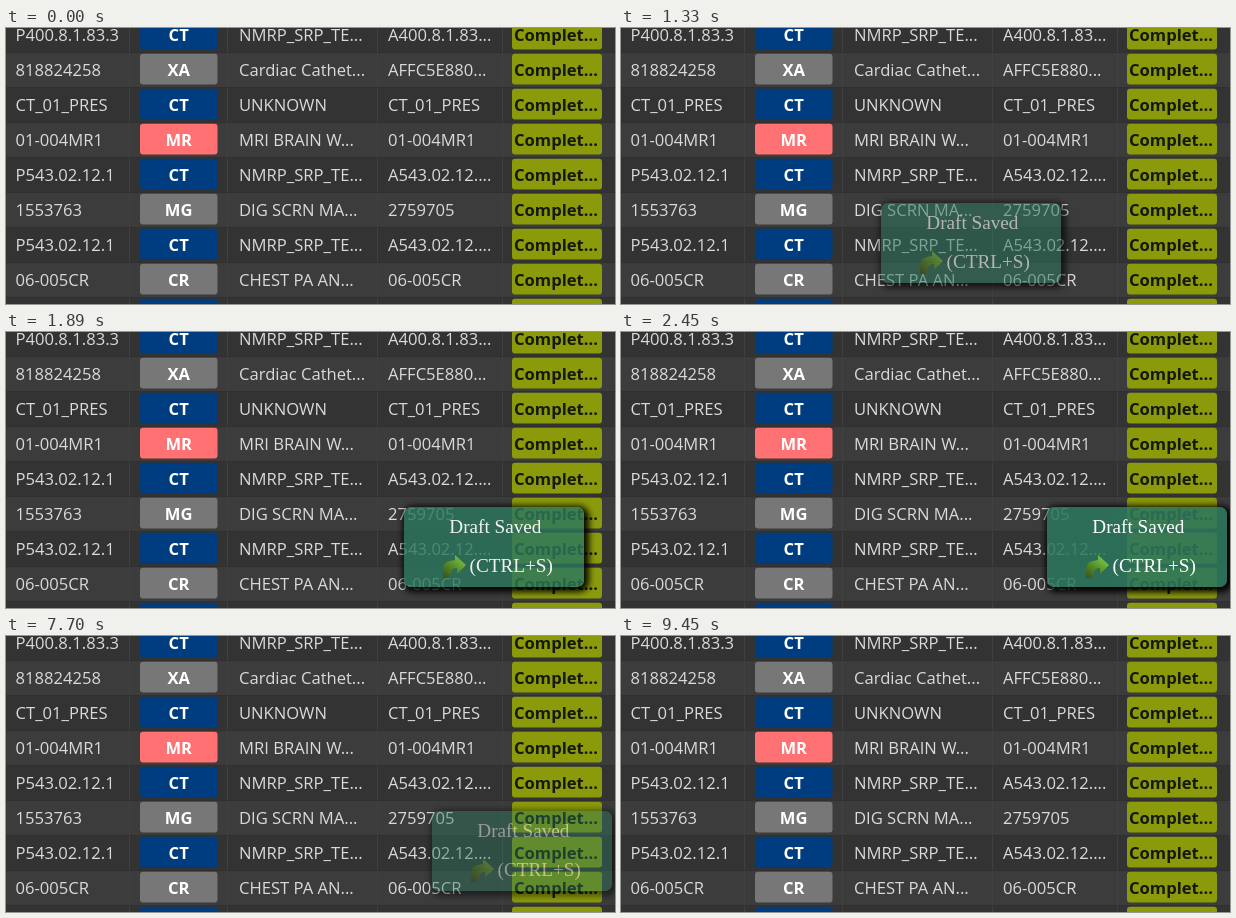
An HTML page with a canvas that plays this animation: 609 by 276 pixels, repeating every 9.59 s.

```html
<!DOCTYPE html>
<html lang="en">
<head>
<meta charset="utf-8">
<title>Draft saved notice</title>
<style>
  html, body { margin: 0; width: 100%; height: 100%; overflow: hidden; background: #353535; }
  canvas { position: absolute; left: 0; top: 0; }
  #toast {
    position: absolute; left: 0; top: 175px; width: 180px; height: 80px;
    border-radius: 7px; background: rgba(44, 119, 93, .87);
    box-shadow: 2px 2px 6px 3px #000; opacity: 0;
  }
  #toast svg { display: block; }
  #toast text { font: 19.2px "Liberation Serif", serif; fill: #fff; }
</style>
</head>
<body>
<canvas id="table" width="609" height="276"></canvas>
<div id="toast">
  <svg width="180" height="80">
    <defs>
      <linearGradient id="leaf" x1="0" y1="1" x2=".8" y2="0">
        <stop offset="0" stop-color="#3a4f1c"/>
        <stop offset=".45" stop-color="#568a24"/>
        <stop offset="1" stop-color="#7fd24a"/>
      </linearGradient>
    </defs>
    <text x="45.3" y="26">Draft Saved</text>
    <path d="M39 71 V63 Q39 55 46 54 L51 53 V48 L62 58 L53 67 V61 Q47 61 47 66 L45 71Z" fill="url(#leaf)"/>
    <text x="65.5" y="65">(CTRL+S)</text>
  </svg>
</div>
<script>
const LOOP = 9590, STEP = 70, PITCH = 35;
const FONT = '16.6px "Open Sans", sans-serif';
const TEXT = '#dadada';
const BADGE = { CT: '#003d80', MR: '#ff7173' };
const ROWS = [
  ['P400.8.1.83.3', 'CT', 'NMRP_SRP_TE...', 'A400.8.1.83...'],
  ['818824258', 'XA', 'Cardiac Cathet...', 'AFFC5E880...'],
  ['CT_01_PRES', 'CT', 'UNKNOWN', 'CT_01_PRES'],
  ['01-004MR1', 'MR', 'MRI BRAIN W...', '01-004MR1'],
  ['P543.02.12.1', 'CT', 'NMRP_SRP_TE...', 'A543.02.12....'],
  ['1553763', 'MG', 'DIG SCRN MA...', '2759705'],
  ['P543.02.12.1', 'CT', 'NMRP_SRP_TE...', 'A543.02.12....'],
  ['06-005CR', 'CR', 'CHEST PA AN...', '06-005CR'],
  ['', 'CT', '', '']
];
const ctx = document.getElementById('table').getContext('2d');
const toast = document.getElementById('toast');

function label(text, x, y, color, bold, align = 'left') {
  ctx.font = (bold ? 'bold ' : '') + FONT;
  ctx.textAlign = align;
  ctx.fillStyle = color;
  ctx.fillText(text, x, y);
}

function badge(x, y, w, color) {
  ctx.fillStyle = color;
  ctx.beginPath();
  ctx.roundRect(x, y, w, 30.7, 3);
  ctx.fill();
}

function drawTable() {
  ROWS.forEach(([id, kind, study, access], i) => {
    const top = (i - 1) * PITCH + 24, base = top + 23.6;
    ctx.fillStyle = i % 2 ? '#3c3c3c' : '#333333';
    ctx.fillRect(0, top, 609, PITCH);
    ctx.fillStyle = '#303030';
    ctx.fillRect(0, top, 609, 1);
    ctx.fillStyle = '#414141';
    for (const x of [123, 221, 371, 496]) ctx.fillRect(x, top + 1, 1, PITCH - 1);
    badge(134, top + 1.8, 77.5, BADGE[kind] || '#777777');
    badge(506, top + 1.8, 90, '#8a9a0b');
    label(id, 9.5, base, TEXT);
    label(kind, 172.7, base, '#ffffff', true, 'center');
    label(study, 233, base, TEXT);
    label(access, 382, base, TEXT);
    label('Complet...', 508, base, '#15180a', true);
  });
}

const clamp = v => Math.min(1, Math.max(0, v));

function frame(now) {
  const t = Math.floor(now % LOOP / STEP) * STEP;
  const enter = t < 700 ? 0 : Math.sin(clamp((t - 630) / 1632) * Math.PI / 2);
  const fade = (1 - clamp((t - 6930) / 2520)) ** 2;
  toast.style.transform = `translateX(${Math.round(441 * enter - 15)}px)`;
  toast.style.opacity = enter * fade;
  requestAnimationFrame(frame);
}

drawTable();
requestAnimationFrame(frame);
</script>
</body>
</html>
```
